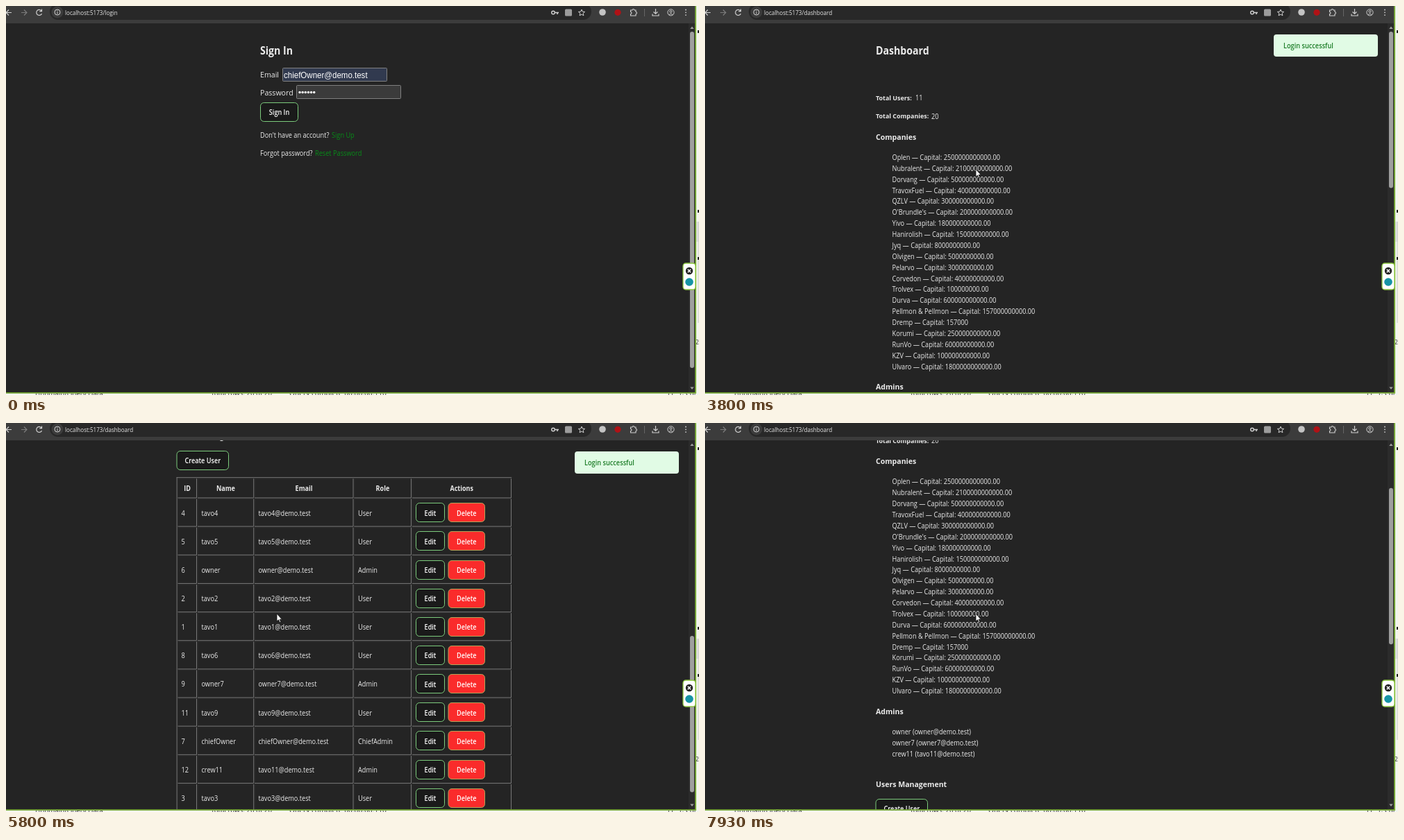
Recreate the animation shown at these times as an HTML page with a canvas. Size 998 by 561 pixels, loop 8000 ms.

```html
<!DOCTYPE html>
<html lang="en">
<head>
<meta charset="utf-8">
<title>Sign in and dashboard</title>
<style>
html, body { margin: 0; width: 100%; height: 100%; overflow: hidden; background: #242424; }
canvas { display: block; width: 100vw; height: 100vh; }
</style>
</head>
<body>
<canvas id="stage" width="998" height="561"></canvas>
<script>
const c = document.getElementById('stage').getContext('2d');
const LOOP = 8000, FPS = 15;
const UI = '"Open Sans", "Noto Sans", sans-serif';
const ARIAL = '"Liberation Sans", Arial, sans-serif';
const NARROW = 0.93; // the whole page is slightly narrower than tall
const INK = '#ebebeb', LINE = '#787878', GREEN = '#7ccb7c';

const companies = [
  ['Oplen', '2500000000000.00'], ['Nubralent', '2100000000000.00'],
  ['Dorvang', '500000000000.00'], ['TravoxFuel', '400000000000.00'],
  ['QZLV', '300000000000.00'], ["O'Brundle's", '200000000000.00'],
  ['Yivo', '180000000000.00'], ['Hanirolish', '150000000000.00'],
  ['Jyq', '8000000000.00'], ['Olvigen', '5000000000.00'],
  ['Pelarvo', '3000000000.00'], ['Corvedon', '40000000000.00'],
  ['Trolvex', '100000000.00'], ['Durva', '600000000000.00'],
  ['Pellmon & Pellmon', '157000000000.00'], ['Dremp', '157000'],
  ['Korumi', '250000000000.00'], ['RunVo', '60000000000.00'],
  ['KZV', '100000000000.00'], ['Ulvaro', '1800000000000.00']
];
const mail = name => name + '@demo.test';
const admins = [['owner', 'owner'], ['owner7', 'owner7'], ['crew11', 'tavo11']];
const users = [
  [4, 'tavo4'], [5, 'tavo5'], [6, 'owner', 'Admin'], [2, 'tavo2'], [1, 'tavo1'], [8, 'tavo6'],
  [9, 'owner7', 'Admin'], [11, 'tavo9'], [7, 'chiefOwner', 'ChiefAdmin'],
  [12, 'crew11', 'Admin', 'tavo11'], [3, 'tavo3']
];

// Key points: [step, value...]
const scrollKeys = [[60, 0], [66, 221], [71, 440], [74, 528], [83, 528], [86, 620], [89, 666],
  [101, 666], [102, 666], [104, 560], [107, 444], [110, 444], [113, 318], [116, 222],
  [117, 222], [118, 180], [119, 133.5]];
const pointerKeys = [[10, 78, 9], [14, 180, 62], [18, 310, 135], [22, 392, 172], [27, 390, 156],
  [53, 390, 156], [59, 390, 275]];

function track(keys, n) {
  if (n <= keys[0][0]) return keys[0].slice(1);
  for (let i = 1; i < keys.length; i++) {
    const a = keys[i - 1], b = keys[i];
    if (n <= b[0]) {
      const k = (n - a[0]) / (b[0] - a[0]);
      return a.slice(1).map((v, j) => v + (b[j + 1] - v) * k);
    }
  }
  return keys[keys.length - 1].slice(1);
}

function text(s, x, mid, { size = 9.9, weight = 400, color = INK, align = 'left', font = UI } = {}) {
  c.save();
  c.translate(x, mid + size * 0.36);
  c.scale(NARROW, 1);
  c.font = `${weight} ${size}px ${font}`;
  c.textAlign = align;
  c.fillStyle = color;
  c.fillText(s, 0, 0);
  c.restore();
}

function rect(x, y, w, h, color) {
  c.fillStyle = color;
  c.fillRect(x, y, w, h);
}

function box(x, y, w, h, r, fill, stroke, lw = 1) {
  c.beginPath();
  c.roundRect(x, y, w, h, r);
  if (fill) { c.fillStyle = fill; c.fill(); }
  if (stroke) { c.strokeStyle = stroke; c.lineWidth = lw; c.stroke(); }
}

function disc(x, y, r, fill, stroke, lw = 1) {
  c.beginPath();
  c.arc(x, y, r, 0, 7);
  if (fill) { c.fillStyle = fill; c.fill(); }
  if (stroke) { c.strokeStyle = stroke; c.lineWidth = lw; c.stroke(); }
}

function path(d, stroke, lw = 1.2, fill) {
  const p = new Path2D(d);
  if (fill) { c.fillStyle = fill; c.fill(p); }
  if (stroke) { c.strokeStyle = stroke; c.lineWidth = lw; c.stroke(p); }
}

// Edges sit on pixel centres so that the border stays crisp
function button(label, x, y, w, fill = '#1a1a1a', stroke = GREEN, lw = 1) {
  box(x, Math.floor(y) + 0.5, w, 27, 5, fill, stroke, lw);
  text(label, x + w / 2, y + 14.4, { size: 9.8, weight: 600, color: '#fff', align: 'center' });
}

function toolbar(url) {
  const g = '#d0d0d0';
  rect(0, 0, 993, 25, '#3c3c3c');
  box(63, -4, 780, 24, 12, '#282828');
  disc(74, 9, 8.5, '#3c3c3c');
  path('M8 9.5H0M4 5.5L0 9.5L4 13.5', g);
  path('M22 9.5H30M26 5.5L30 9.5L26 13.5', '#7c7c7c');
  path('M51 7A4 4 0 1 0 51.5 11M51.5 4.5V7.7H48.3', g);
  disc(74, 9, 4, null, g);
  path('M74 8.5V11.5M74 6.5V7.5', g, 1);
  text(url, 85, 9.6, { size: 8.7, color: '#e6e6e6' });
  disc(788, 9.5, 2.3, null, g, 1.4);
  path('M790 9.5H796M794 9.5V12', g, 1.5);
  box(805, 4.5, 10, 10, 1.5, '#9c9c9c');
  path('M829 5L830.3 8.1L833.6 8.4L831.1 10.6L831.9 13.8L829 12.1L826.1 13.8L826.9 10.6L824.4 8.4L827.7 8.1Z', g, 1);
  disc(859, 9, 4.8, '#c4c4c4');
  disc(881, 9.3, 4.6, '#b01216');
  path('M899.5 6H902A1.5 1.5 0 0 1 905 6H907V8.5A1.5 1.5 0 0 1 907 11.5V14H899.5V11.5A1.5 1.5 0 0 0 899.5 8.5Z', g, 1.1);
  rect(919, 4, 1, 11, '#666');
  path('M935.5 4V11M932.5 8.5L935.5 11.3L938.5 8.5M931 11.5V14H940V11.5', g);
  disc(957.5, 9.3, 4.6, null, g);
  disc(957.5, 8, 1.5, null, g);
  path('M954.5 12.6Q957.5 9.8 960.5 12.6', g, 1);
  for (const y of [5.5, 9.3, 13.1]) disc(979, y, 0.9, g);
}

function scrollbar(top, height) {
  rect(983, 25, 9.5, 532, '#2b2b2b');
  box(985, top, 6, height, 3, '#9f9f9f');
  path('M985.3 33L988 29.5L990.7 33Z', null, 0, '#9f9f9f');
  path('M985.3 549.5L988 553L990.7 549.5Z', null, 0, '#9f9f9f');
}

// Window edge, with a sliver of the window behind it
function surround() {
  c.save();
  c.beginPath();
  c.rect(0, 558.5, 998, 3);
  c.rect(994, 0, 4, 561);
  c.clip();
  rect(0, 0, 998, 561, '#f2f5ee');
  const o = { size: 10.5, color: '#333' };
  text('Hubmain/Query Data', 42, 559, o);
  text('Total rows: 20 of 20', 295, 558, o);
  text('Query complete 00:00:00.116', 408, 558, { ...o, size: 11 });
  text('LF  1, Col', 953, 558, o);
  text('20', 993, 485, { size: 9, color: '#333' });
  rect(994, 311, 4, 29, '#e2e2e2');
  rect(996.5, 311, 1, 146, '#c9c9c9');
  for (const y of [35, 294, 362]) rect(996, y, 2, 4, '#222');
  c.restore();
  rect(992.3, 0, 1.8, 559, '#7fb539');
  rect(0, 557.2, 994, 1.6, '#7fb539');
}

function widget() {
  box(975, 371, 18, 38, 4, '#fff', '#8cc63f', 1.3);
  disc(984, 382, 5.2, '#222');
  path('M981.8 379.8L986.2 384.2M986.2 379.8L981.8 384.2', '#fff', 1.5);
  disc(984, 398, 5.8, '#1694a5');
}

function login(pressed) {
  const label = { size: 11.4 }, link = '#078c18';
  text('Sign In', 366, 65, { size: 15.2, weight: 700 });
  text('Email', 366, 99.3, label);
  box(398.5, 89.5, 150, 19, 1, '#313a4f', '#808080');
  text(mail('chiefOwner'), 400, 99.3, { size: 12.4, color: '#fff', font: ARIAL });
  text('Password', 366, 124.5, label);
  box(418.5, 114.5, 150, 19, 1, '#3b3b3b', '#808080');
  for (let i = 0; i < 6; i++) disc(423 + i * 4.15, 124.5, 1.7, '#fff');
  button('Sign In', 366.5, 139.3, 54, '#1a1a1a', pressed ? '#fff' : GREEN, pressed ? 1.7 : 1);
  text("Don't have an account?", 366, 186);
  text('Sign Up', 469, 186, { color: link });
  text('Forgot password?', 366, 212.3);
  text('Reset Password', 445, 212.3, { color: link });
}

function table(top) {
  const cols = [[247.5, 274.5], [276, 356.7], [358, 500], [501.3, 583.5], [585, 727.5]];
  const titles = ['ID', 'Name', 'Email', 'Role', 'Actions'];
  const pitch = 41.15, dim = '#2f2f2f';
  const end = top + 29.3 + users.length * pitch;
  rect(245.6, top - 0.5, 482.6, 1, LINE);
  rect(245.6, top - 0.5, 1, end - top + 2.5, LINE);

  // Inset cells: bright on the right and bottom, dim on the left and top
  function cells(y0, y1) {
    for (const [a, b] of cols) {
      rect(a, y0, b - a, 0.6, dim);
      rect(a, y0, 0.6, y1 - y0, dim);
      rect(a, y1 - 0.5, b - a, 1, LINE);
      rect(b - 0.5, y0, 1, y1 - y0, LINE);
    }
  }
  cells(top + 1.5, top + 29.3);
  titles.forEach((s, i) => text(s, (cols[i][0] + cols[i][1]) / 2, top + 16.3,
    { size: 9.7, weight: 700, align: 'center' }));

  users.forEach(([id, name, role = 'User', inbox = name], i) => {
    const y = top + 29.3 + i * pitch, mid = y + 22;
    cells(y + 1.5, y + pitch);
    text(id, 252.5, mid);
    text(name, 281.5, mid);
    text(mail(inbox), 363.5, mid);
    text(role, 507, mid);
    button('Edit', 590.5, mid - 14.2, 41);
    button('Delete', 637, mid - 14.2, 52.5, '#fa2b2b', '#b5a35a');
  });
}

function dashboard(scroll) {
  const top = 714 - scroll, head = { size: 11.35, weight: 700 };
  text('Dashboard', 246, top - 649, { size: 15.2, weight: 700 });
  [['Total Users:', 11, 303, -581.5], ['Total Companies:', 20, 326, -555]].forEach(([s, n, x, y]) => {
    text(s, 246, top + y, { size: 9.6, weight: 700 });
    text(n, x, top + y);
  });
  text('Companies', 246, top - 525.5, head);
  companies.forEach(([name, sum], i) =>
    text(`${name} — Capital: ${sum}`, 269.5, top - 495.7 + i * 15.88));
  text('Admins', 246, top - 165, head);
  admins.forEach(([name, inbox], i) =>
    text(`${name} (${mail(inbox)})`, 269.5, top - 135 + i * 15.88));
  text('Users Management', 246, top - 60, head);
  button('Create User', 246, top - 38.3, 74.5);
  table(top);
}

function toast(alpha) {
  c.globalAlpha = alpha;
  box(819, 41, 150, 32, 4, '#e1fbe5');
  text('Login successful', 833, 57.5, { weight: 600, color: '#1c7d27' });
  c.globalAlpha = 1;
}

function pointer(x, y, hand) {
  c.save();
  c.translate(x, y);
  c.lineJoin = 'round';
  if (hand) {
    path('M-1.2 1Q0 -0.5 1 1V5L5 6.2Q6.3 6.8 6 8.5L5 12.5H-0.5L-3.5 9Q-3.5 7.6 -1.2 9Z', '#111', 0.9, '#fff');
  } else {
    path('M0 0V11L2.5 8.8L4.2 12.6L5.8 11.9L4.2 8.2H7.4Z', '#111', 0.8, '#fff');
  }
  c.restore();
}

function draw(ms) {
  const step = Math.floor((ms + 4) * FPS / 1000);
  const inside = step >= 43;
  const [scroll] = track(scrollKeys, step);

  c.clearRect(0, 0, 998, 561);
  rect(0, 0, 993, 558, '#242424');
  c.save();
  c.beginPath();
  c.rect(0, 25, 983, 532.5);
  c.clip();
  if (inside) dashboard(scroll);
  else login(step >= 37);
  if (inside && step < 88) toast(Math.min(1, (step - 42) / 3));
  c.restore();

  if (inside) scrollbar(37 + scroll * 0.425, 225.5);
  else scrollbar(37, 485);
  toolbar('localhost:5173/' + (inside ? 'dashboard' : 'login'));
  surround();
  widget();
  if (step >= 10) {
    const [x, y] = track(pointerKeys, step);
    pointer(x, y, step >= 21 && !inside);
  }
}

function tick() {
  draw(performance.now() % LOOP);
  requestAnimationFrame(tick);
}
tick();
</script>
</body>
</html>
```
